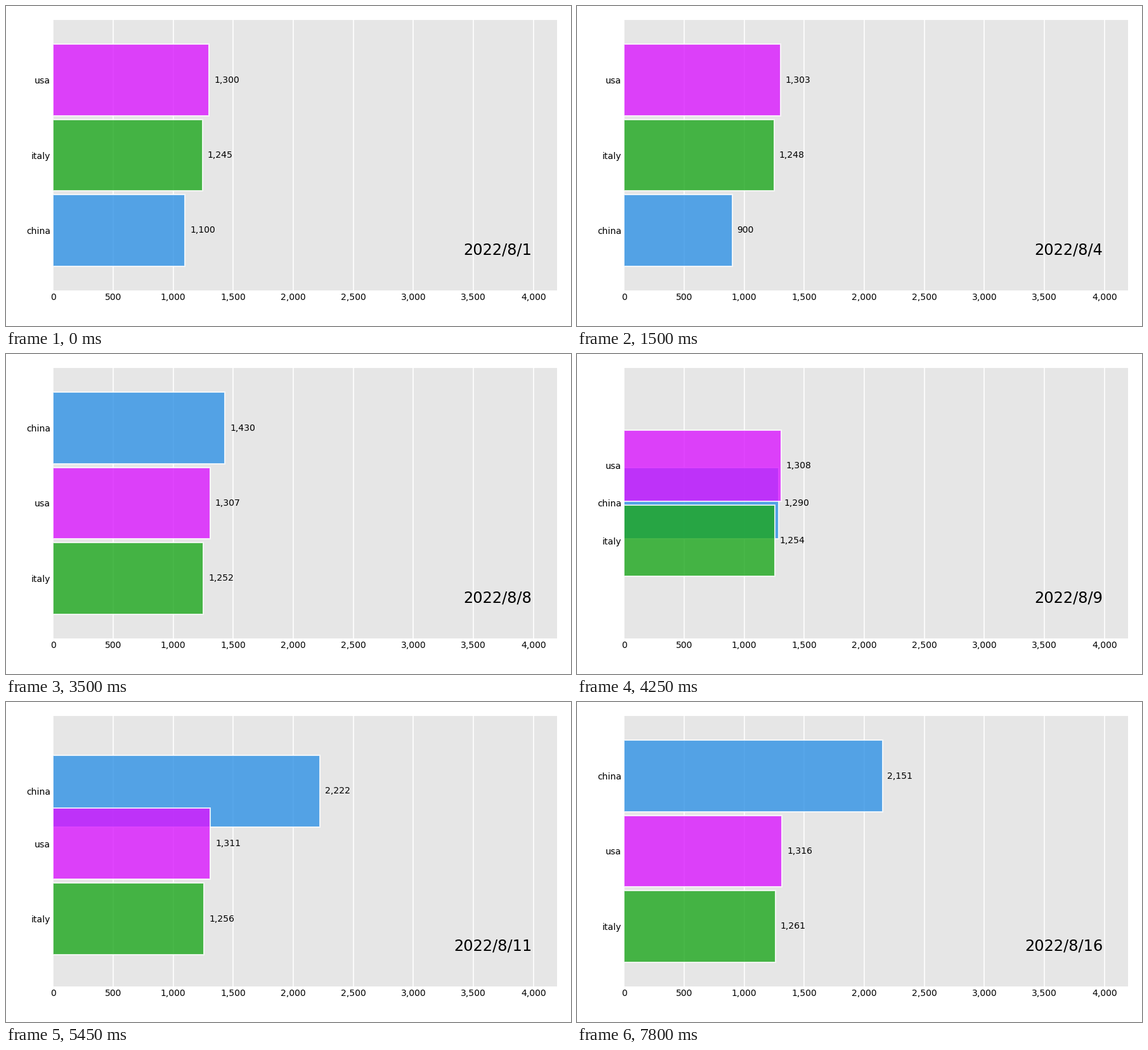
Animation, 891 px wide and 504 px high, one loop 8 s. Source, as a matplotlib script:

```python
import matplotlib.pyplot as plt
import numpy as np
from matplotlib.animation import FuncAnimation

WIDTH, HEIGHT, DPI = 891, 504, 144
LEFT, BOTTOM, AX_W, AX_H = 74.045, 56, 795, 426
STEPS_PER_DAY, INTERVAL, FRAMES = 10, 50, 160
X_MAX = 3600 * 1.05 * 1.11

names = ["china", "italy", "usa"]
colors = ["#2E91E5", "#1CA71C", "#DA16FF"]

days = np.arange(17)
china = [1100, 1200, 1300, 900, 1400, 1375, 1400, 1430, 1400,
         1180, 1100, 2347, 2147, 2148, 2149, 2150, 2151]
values = np.array([china, 1245 + days, 1300 + days])
ranks = values.argsort(axis=0).argsort(axis=0) + 1

plt.rcParams["font.family"] = "DejaVu Sans"
fig = plt.figure(figsize=(WIDTH / DPI, HEIGHT / DPI), dpi=DPI, facecolor="white")
ax = fig.add_axes([LEFT / WIDTH, BOTTOM / HEIGHT, AX_W / WIDTH, AX_H / HEIGHT],
                  facecolor=".9")
ax.set_xlim(0, X_MAX)
ax.set_ylim(0.2, 3.8)
ax.set_xticks(range(0, 4001, 500))
ax.xaxis.set_major_formatter("{x:,.0f}")
ax.tick_params(labelsize=7, length=0, pad=2)
ax.grid(True, axis="x", color="white", linewidth=0.8)
ax.set_axisbelow(True)
ax.spines[:].set_visible(False)

bars = ax.barh(ranks[:, 0], values[:, 0], height=0.95, color=colors,
               edgecolor="white", linewidth=1, alpha=0.8)
ax.set_xlim(0, X_MAX)
ax.set_ylim(0.2, 3.8)
labels = [ax.text(0, 0, "", size=7, ha="left", va="center") for _ in names]
date = ax.text(0.95, 0.15, "", size=12, ha="right", va="center",
               transform=ax.transAxes)


def update(frame):
    day = frame / STEPS_PER_DAY
    widths = [np.interp(day, days, row) for row in values]
    heights = [np.interp(day, days, row) for row in ranks]
    for bar, label, x, y in zip(bars, labels, widths, heights):
        bar.set_width(x)
        bar.set_y(y - bar.get_height() / 2)
        label.set_position((x + 0.01 * X_MAX, y))
        label.set_text(f"{x:,.0f}")
    ax.set_yticks(heights, names)
    date.set_text(f"2022/8/{1 + frame // STEPS_PER_DAY}")
    return [*bars, *labels, date]


anim = FuncAnimation(fig, update, frames=FRAMES, interval=INTERVAL,
                     init_func=lambda: update(0), repeat=True, repeat_delay=0)
plt.show()
```
